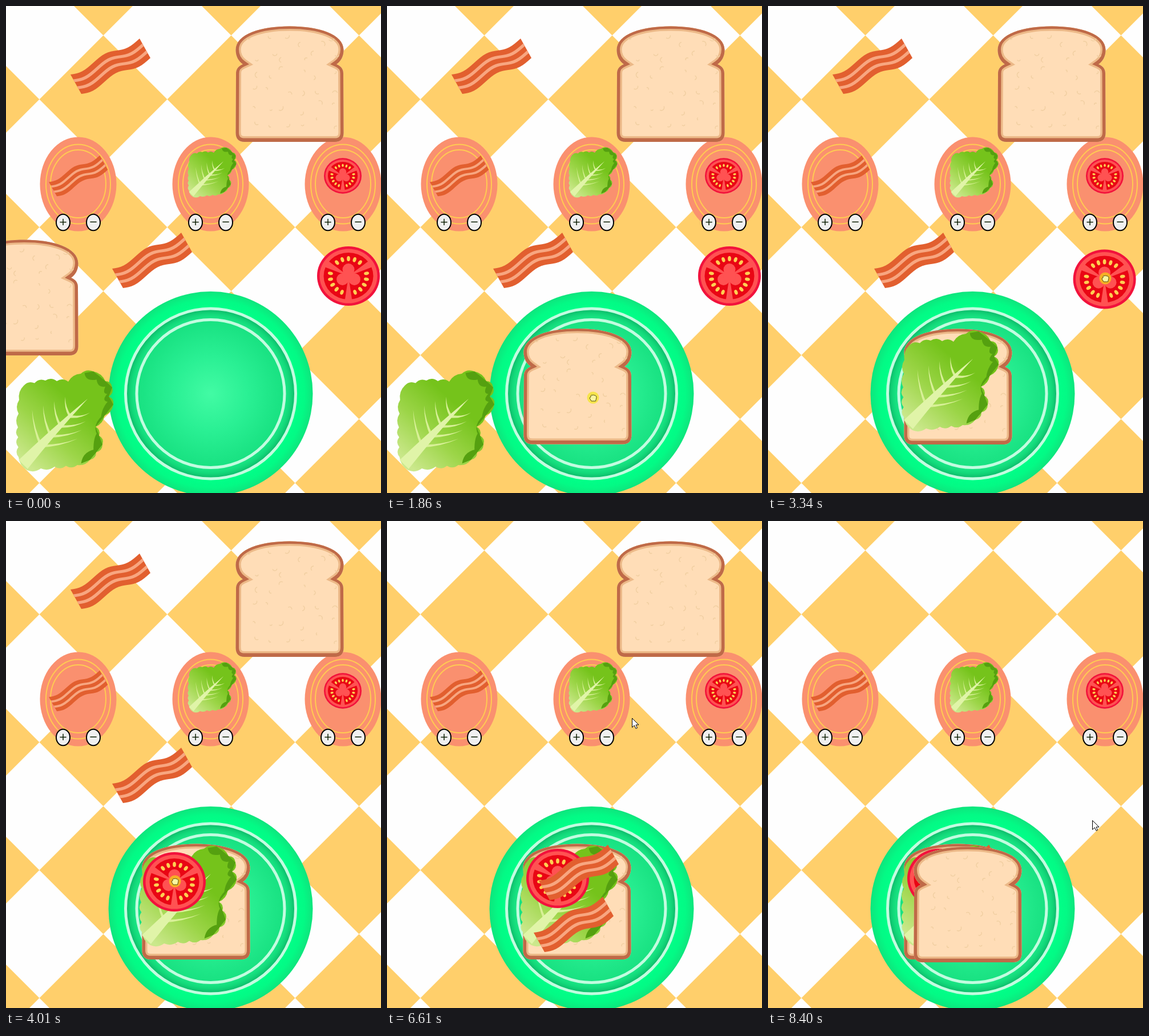
Recreate the animation shown at these times as an HTML page with a canvas. Size 657 px wide and 853 px high, loop 8550 ms.

```html
<!DOCTYPE html>
<html lang="en">
<head>
<meta charset="utf-8">
<title>Build a sandwich</title>
<style>
html, body { margin: 0; width: 100%; height: 100%; overflow: hidden; background: #fefefe; }
canvas { display: block; }
</style>
</head>
<body>
<canvas id="stage" width="657" height="853"></canvas>
<script>
const W = 657, H = 853, LOOP = 8550, FIRST = 520, STEP = 74.3;
const c = document.getElementById('stage').getContext('2d');

// Home place and drag path (time, pointer x, pointer y), in draw order
const items = [
  { draw: bread, x: -63, y: 409, drag: [[500, 59, 530], [1337, 377, 627], [1530, 438, 640], [1880, 360, 686]] },
  { draw: lettuce, x: 19, y: 640, drag: [[2290, 143, 726], [2526, 247, 687], [2800, 359, 656]] },
  { draw: tomato, x: 600, y: 473, drag: [[3260, 601, 472], [4012, 296, 631], [4200, 300, 625]] },
  { draw: bacon, x: 186, y: 396, drag: [[4470, 256, 447], [5050, 336, 617]] },
  { draw: bacon, x: 113, y: 56, drag: [[5428, 143, 125], [5795, 163, 241], [6290, 287, 726]] },
  { draw: bread, x: 402, y: 35, drag: [[6805, 494, 170], [7580, 347, 692], [7900, 347, 705]] }
];
for (const it of items) {
  it.grab = it.drag[0][0];
  it.drop = it.drag[it.drag.length - 1][0];
}
const path = [...items.flatMap(it => it.drag), [8396, 568, 524]];
const stops = items.flatMap(it => [it.grab, it.drop]).concat(8396);

const clamp = (v, a, b) => Math.max(a, Math.min(b, v));
const mix = (a, b, u) => a.map((v, i) => v + (b[i] - v) * u);

// The picture advances in even steps
const snap = t => t < FIRST ? 0 : FIRST + STEP * Math.floor((t - FIRST) / STEP + 0.35);

const slope = (i, a) => (path[i + 1][a] - path[i][a]) / (path[i + 1][0] - path[i][0]);

function tangent(i, a) {
  if (stops.includes(path[i][0])) return 0;
  const p = slope(i - 1, a), q = slope(i, a);
  return p * q <= 0 ? 0 : 2 * p * q / (p + q);
}

// Monotone cubic that rests at each grab and drop
function pointer(t) {
  t = clamp(t, path[0][0], path[path.length - 1][0]);
  let i = 0;
  while (i < path.length - 2 && path[i + 1][0] <= t) i++;
  const d = path[i + 1][0] - path[i][0], u = (t - path[i][0]) / d;
  const s = u * u * (3 - 2 * u);
  return [1, 2].map(a => path[i][a] * (1 - s) + path[i + 1][a] * s +
    d * u * (1 - u) * ((1 - u) * tangent(i, a) - u * tangent(i + 1, a)));
}

function random(seed) {
  return () => (seed = seed * 16807 % 2147483647) / 2147483647;
}

function ellipse(x, y, rx, ry, fill, stroke, width, turn = 0) {
  c.beginPath();
  c.ellipse(x, y, rx, ry, turn, 0, 7);
  if (fill) { c.fillStyle = fill; c.fill(); }
  if (stroke) { c.strokeStyle = stroke; c.lineWidth = width; c.stroke(); }
}

function shape(d, fill, stroke, width) {
  const p = new Path2D(d);
  if (fill) { c.fillStyle = fill; c.fill(p); }
  if (stroke) { c.strokeStyle = stroke; c.lineWidth = width; c.stroke(p); }
}

function place(draw, x, y, s = 1) {
  c.save();
  c.translate(x, y);
  c.scale(s, s);
  draw();
  c.restore();
}

function shade(g, ...colors) {
  colors.forEach((col, i) => g.addColorStop(i / (colors.length - 1), col));
  return g;
}

function cloth() {
  c.fillStyle = '#fefefe';
  c.fillRect(0, 0, W, H);
  for (let x = -53.5; x < W + 112; x += 224)
    for (let y = -60.5; y < H + 112; y += 224)
      shape(`M${x} ${y - 112}l112 112l-112 112l-112 -112z`, '#ffcf6b');
}

function bigPlate() {
  const x = 358.5, y = 679;
  const disc = (r0, r, colors, rim) =>
    ellipse(x, y, r, r, shade(c.createRadialGradient(x, y, r0, x, y, r), ...colors), rim, 5);
  disc(150, 179, ['#00ff88', '#03fa85', '#0ee57d']);
  disc(130, 149, ['#1ce887', '#12d97a', '#0cb567'], '#c2fce0');
  disc(0, 129.5, ['#42fba4', '#2af094', '#18e181'], '#c2fce0');
}

function button(x, sign) {
  ellipse(x, 379, 12, 14.3, '#f0f0f0', '#000', 2);
  c.fillStyle = '#0b1d02';
  c.font = '18px "DejaVu Sans", sans-serif';
  c.textAlign = 'center';
  c.fillText(sign, x, 383.5);
}

function dish(x) {
  ellipse(x, 312, 67, 82.5, '#fa906f');
  ellipse(x, 312, 56.5, 69.5, null, '#ffcb52', 2);
  ellipse(x, 311.5, 48.5, 59.5, null, '#ffcb52', 2);
  button(x - 26.5, '+');
  button(x + 26.5, '\u2212');
}

const loaf = new Path2D('M95 .5C45 .5 .5 14 .5 42C.5 54 6 62 13 67C4 71 1 76 1 84L.5 187Q.5 203 16 203' +
  'H174Q189.5 203 189.5 187L189 84C189 76 186 71 177 67C184 62 189.5 54 189.5 42C189.5 14 145 .5 95 .5Z');

function bread() {
  const rnd = random(77);
  c.save();
  c.fillStyle = '#ffddb7';
  c.fill(loaf);
  c.clip(loaf);
  c.translate(0, -1);
  for (const [col, w] of [['#ecb988', 18], ['#bf6a48', 11]]) {
    c.strokeStyle = col;
    c.lineWidth = w;
    c.stroke(loaf);
  }
  // Crumbs on a jittered grid
  c.strokeStyle = '#f1cfa2';
  c.lineWidth = 1.5;
  for (let x = 30; x < 180; x += 29)
    for (let y = 28; y < 190; y += 29) {
      const a = rnd() * 6;
      c.beginPath();
      c.arc(x + rnd() * 20 - 10, y + rnd() * 20 - 10, 2 + rnd() * 3, a, a + 2.6);
      c.stroke();
    }
  c.restore();
}

// Strip of a wavy ribbon between two fractions of its width
function band(f, g, col) {
  const at = (u, k) => [121 * u + 19 * k, 64 - 63 * u + 5 * Math.sin(3 * Math.PI * u) + 34 * k];
  const edge = k => Array.from({ length: 25 }, (_, i) => at(i / 24, k));
  shape('M' + [...edge(f), ...edge(g).reverse()].join('L') + 'Z', col);
}

function bacon() {
  band(0, 1, '#e25f2f');
  for (const f of [0.25, 0.61]) band(f, f + 0.14, '#f8a680');
}

const rim = [[3, 150], [2, 98], [4, 50], [12, 25], [50, 16], [90, 18], [112, 4], [134, 0], [155, 17], [167, 28],
  [161, 44], [169, 58], [138, 97], [150, 128], [128, 155], [106, 164], [66, 167], [18, 173]];

// Closed outline with small bumps along every side
function frill(pts) {
  let d = 'M' + pts[0];
  pts.forEach((p, i) => {
    const q = pts[(i + 1) % pts.length], dx = q[0] - p[0], dy = q[1] - p[1];
    const len = Math.hypot(dx, dy), n = Math.max(1, Math.round(len / 20));
    for (let k = 0; k < n; k++) {
      const m = mix(p, q, (k + 0.5) / n);
      d += `Q${m[0] + dy / len * 7} ${m[1] - dx / len * 7} ${mix(p, q, (k + 1) / n)}`;
    }
  });
  return d + 'Z';
}

function vein(p, q, w, bend, col) {
  const dx = q[0] - p[0], dy = q[1] - p[1], len = Math.hypot(dx, dy);
  const nx = dy / len, ny = -dx / len, m = mix(p, q, 0.5);
  const ctrl = s => [m[0] + nx * (bend + s * w / 2), m[1] + ny * (bend + s * w / 2)];
  shape(`M${p[0] + nx * w} ${p[1] + ny * w}Q${ctrl(1)} ${q}Q${ctrl(-1)} ${p[0] - nx * w} ${p[1] - ny * w}Z`, col);
}

function lettuce() {
  shape(frill(rim), shade(c.createLinearGradient(15, 160, 105, 60), '#cbe88c', '#9cd548', '#75c31b'));
  // Dark folds at the tips on the right
  rim.forEach((p, i) => {
    if (p[0] < 125) return;
    const a = mix(p, rim[i - 1], 0.7), b = mix(p, rim[i + 1], 0.7);
    shape(`M${a}Q${mix(p, [80, 85], 0.25)} ${b}L${p}Z`, '#55a010');
  });
  const root = [11, 163], tip = [124, 48];
  for (const u of [0.28, 0.43, 0.58, 0.73]) {
    const p = mix(root, tip, u), len = 82 - 65 * u;
    vein(p, [p[0] - len * 0.25, p[1] - len], 2.5, 6, '#d8f097');
    vein(p, [p[0] + len, p[1] - len * 0.2], 2.5, -6, '#d8f097');
  }
  vein(root, tip, 11, 3, '#e0f4a8');
}

function tomato() {
  const pink = '#ff5252', polar = (a, r) => [Math.cos(a) * r, Math.sin(a) * r * 0.95];
  ellipse(0, 0, 55, 52, '#f2123c');
  ellipse(0, 0, 50.5, 47.5, pink);
  ellipse(0, 0, 43.5, 41, '#e90614');
  for (let k = 0; k < 3; k++) {
    const wall = Math.PI * (0.5 + k * 2 / 3), lobe = wall + Math.PI;
    shape(`M0 0L${polar(wall - 0.14, 46)}L${polar(wall + 0.14, 46)}Z`, pink);
    ellipse(...polar(lobe, 12), 10.5, 10.5, pink);
    for (let i = -2; i <= 2; i++) {
      const a = lobe + i * 0.34;
      ellipse(...polar(a, 32), 4.5, 2.9, '#ffcf52', null, 0, a);
    }
  }
  ellipse(0, 0, 11, 11, pink);
}

function arrow() {
  shape('M.5 .5V16.5L4.3 13L7 18.5L9.5 17.4L7 12H12Z', '#fff', '#000', 1);
}

function hand() {
  ellipse(0, 0, 10.5, 10.5, 'rgba(240,232,10,.62)');
  shape('M-3 6L-6 1Q-6 -1 -4 -1V-3Q-3 -6 -1 -4Q0 -6 2 -4Q4 -5 4.5 -3Q6.5 -3 6 0L4.5 6Z', '#fbf6a0', '#55510c', 1);
}

function frame(now) {
  const s = snap(now % LOOP);
  cloth();
  bigPlate();
  [126.5, 358.5, 590.5].forEach(dish);
  place(bacon, 75, 261, 0.738);
  place(lettuce, 319, 248, 0.5);
  place(tomato, 590, 297.5, 0.6);
  for (const it of items) {
    const from = pointer(it.grab), to = pointer(clamp(s, it.grab, it.drop));
    place(it.draw, it.x + to[0] - from[0], it.y + to[1] - from[1]);
  }
  const held = items.some(it => s >= it.grab && s < it.drop);
  if (s > 0) place(held ? hand : arrow, ...pointer(s).map(Math.round));
}

const start = performance.now();
function tick() {
  frame(performance.now() - start);
  requestAnimationFrame(tick);
}
tick();
</script>
</body>
</html>
```
